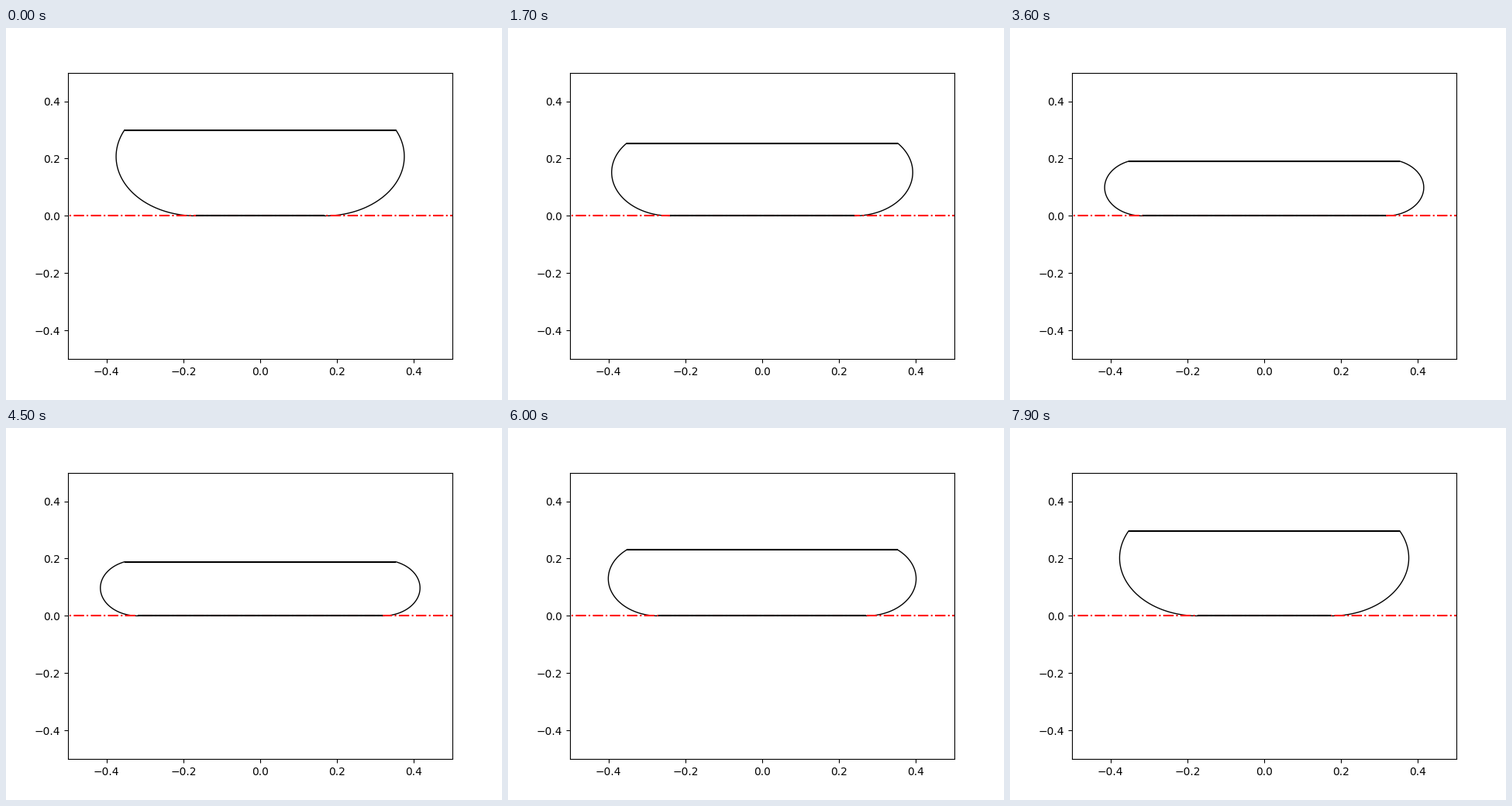
These frames come from a looping animation (640 px wide and 480 px high, 8 s). A matplotlib script:

```python
import numpy as np
import matplotlib.pyplot as plt
from matplotlib.animation import FuncAnimation

# A load on a soft air cushion: constant pressure, inextensible skin.
HALF = 0.353                 # half width of the plate
SKIN = 3 * np.pi / 16        # half length of the free skin
H0 = 0.3
PRESSURE, MASS, G, DT = 2000, 100, 10, 0.01
FRAMES = 80

# Plate height as a function of the side arc's angle, for inversion.
ANGLES = np.linspace(1.6, 3.1, 4000)
HEIGHTS = (SKIN - HALF) * (1 - np.cos(ANGLES)) / (ANGLES - np.sin(ANGLES))


def cushion(h):
    """Arc angle, arc radius and half contact width at plate height h."""
    angle = np.interp(h, HEIGHTS[::-1], ANGLES[::-1])
    radius = h / (1 - np.cos(angle))
    return angle, radius, SKIN - radius * angle


def simulate():
    h, v, track = H0, 0.0, []
    for _ in range(FRAMES):
        contact = 2 * cushion(h)[2]
        v += (PRESSURE * contact / MASS - G) * DT
        h += v * DT
        track.append(h)
    return track


track = simulate()

fig, ax = plt.subplots(figsize=(6.4, 4.8), dpi=100)
ax.set_xlim(-0.5, 0.5)
ax.set_ylim(-0.5, 0.5)

ax.plot([-1, 1], [0, 0], "r-.", lw=1.5)
top, = ax.plot([], [], "k", lw=1.5, solid_capstyle="butt")
bottom, = ax.plot([], [], "k", lw=1.5, solid_capstyle="butt")
sides = [ax.plot([], [], "k", lw=1, zorder=1)[0] for _ in range(2)]


def update(i):
    h = track[i]
    angle, radius, contact = cushion(h)
    top.set_data([-HALF, HALF], [h, h])
    bottom.set_data([-contact, contact], [0, 0])
    t = np.linspace(0, angle, 80)
    x = contact + radius * np.sin(t)
    y = radius * (1 - np.cos(t))
    for side, sign in zip(sides, (-1, 1)):
        side.set_data(sign * x, y)
    return [top, bottom, *sides]


anim = FuncAnimation(fig, update, frames=FRAMES, interval=100,
                     repeat=True, repeat_delay=0)
plt.show()
```
